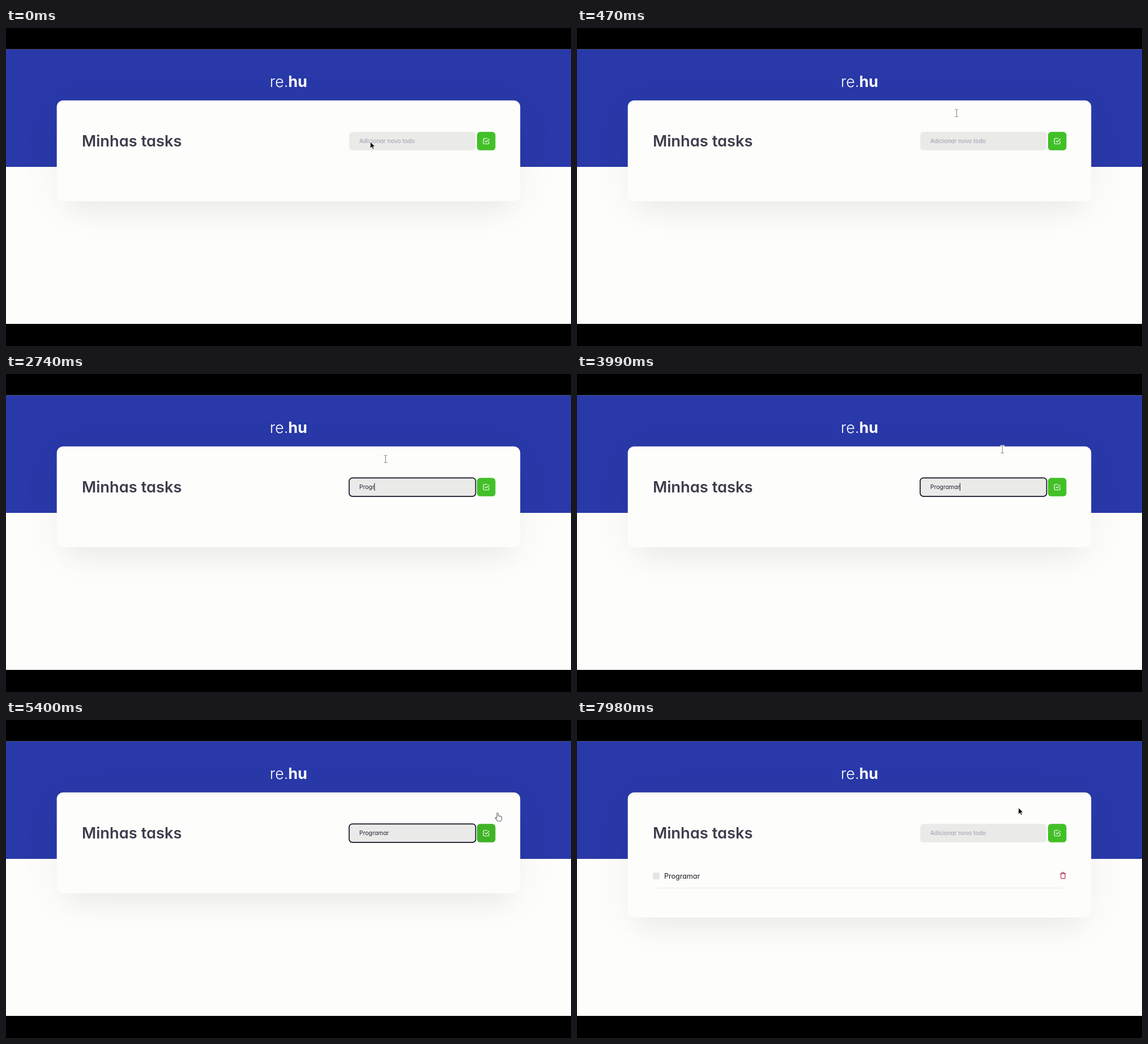
Write an HTML page that moves like this. It is 998x561 px and loops after 8000 ms.

```html
<!DOCTYPE html>
<html lang="pt">
<head>
<meta charset="utf-8">
<title>Minhas tasks</title>
<style>
  html, body { margin: 0; width: 100%; height: 100%; overflow: hidden; background: #000; }
  svg { display: block; width: 100%; height: 100%; }
  text { font-family: Inter, "Open Sans", sans-serif; font-feature-settings: "cv11"; white-space: pre; }
  .icon { fill: none; stroke-linecap: round; stroke-linejoin: round; }
</style>
</head>
<body>
<svg viewBox="0 0 998 561">
  <defs>
    <filter id="wide" filterUnits="userSpaceOnUse" x="-100" y="-50" width="1200" height="700"><feGaussianBlur stdDeviation="40"/></filter>
    <filter id="near" filterUnits="userSpaceOnUse" x="-100" y="-50" width="1200" height="700"><feGaussianBlur stdDeviation="22"/></filter>
  </defs>

  <rect y="37" width="998" height="485" fill="#fdfdfb"/>
  <rect y="37.5" width="998" height="207.5" fill="#2939a9"/>

  <rect class="grow" data-h="177.5" x="90" y="138" width="818" rx="11" opacity=".045" filter="url(#wide)"/>
  <rect class="grow" data-h="167.5" x="108" y="156" width="782" rx="11" opacity=".04" filter="url(#near)"/>
  <rect class="grow" data-h="177.8" x="89.7" y="127.7" width="818.6" rx="11.5" fill="#fdfdfb"/>

  <text x="466" y="104" font-size="27" font-weight="300" fill="#fff">re.<tspan font-weight="700">hu</tspan></text>
  <text x="134" y="208.5" font-size="27.3" font-weight="600" fill="#3d3d4d">Minhas tasks</text>

  <rect x="606.3" y="183.3" width="223" height="32.5" rx="5.5" fill="#eaeae8"/>
  <rect id="ring" x="606.2" y="183.4" width="223.4" height="32.4" rx="5.5" fill="none" stroke="#111120" stroke-width="1.7"/>
  <text id="hint" x="624" y="203" font-size="10.3" fill="#9d9ab0">Adicionar novo todo</text>
  <text id="typed" x="624" y="203" font-size="10.4" fill="#25243a"></text>
  <rect id="caret" y="192.5" width="1" height="13.5" fill="#111"/>

  <rect id="button" x="832" y="183.3" width="32.5" height="32.5" rx="5.5"/>
  <g class="icon" stroke="#fff" stroke-width="1.15">
    <path d="M846.4 199.2l1.9 1.9 5.2-5.3"/>
    <path d="M853 199.9v3.4a1.2 1.2 0 0 1-1.2 1.2h-7.3a1.2 1.2 0 0 1-1.2-1.2v-7.3a1.2 1.2 0 0 1 1.2-1.2h5.6"/>
  </g>

  <g id="task">
    <rect x="134" y="269" width="12" height="12" rx="2" fill="#e6e6e8"/>
    <text x="154" y="279.7" font-size="12.5" fill="#1c1c22">Programar</text>
    <path d="M134 296.5H864.5" stroke="#eeeee0"/>
    <path class="icon" stroke="#b32f4a" stroke-width="1.2" d="M853.6 271.2h9.6M854.8 271.2v7.2a1.2 1.2 0 0 0 1.2 1.2h4.8a1.2 1.2 0 0 0 1.2-1.2v-7.2M856.3 271v-1a1.2 1.2 0 0 1 1.2-1.2h1.8a1.2 1.2 0 0 1 1.2 1.2v1"/>
  </g>

  <g id="arrow"><path d="M0 0V11.2L2.7 8.8 4.5 12.7 6.4 11.9 4.6 8.1 8.2 8Z" stroke="#fff" stroke-width=".7"/></g>
  <g id="beam" class="icon">
    <path id="bar" stroke="#fff" stroke-width="2.6" d="M-2.6-6.3H-1Q0-6.3 0-5.3V5.3Q0 6.3-1 6.3H-2.6M2.6-6.3H1Q0-6.3 0-5.3M2.6 6.3H1Q0 6.3 0 5.3"/>
    <path stroke="#85858a" stroke-width="1.1" d="M-2.6-6.3H-1Q0-6.3 0-5.3V5.3Q0 6.3-1 6.3H-2.6M2.6-6.3H1Q0-6.3 0-5.3M2.6 6.3H1Q0 6.3 0 5.3"/>
  </g>
  <g id="hand"><path fill="#fff" stroke="#68686e" stroke-width="1.1" stroke-linejoin="round" d="M-3 2.2V-6A1.25 1.25 0 0 1-.5-6V-1.6Q.8-2.6 1.8-1.3 3-2.1 3.9-.8 5.6-1.2 5.7.6V3Q5.6 5 4.2 7.3H-2.2Q-3.6 4.5-5.6 2.2C-6.2.6-4.6.2-3 2.2Z"/></g>

  <rect width="998" height="37.5"/>
  <rect y="522" width="998" height="39"/>
</svg>
<script>
  const LOOP = 8000, WORD = "Programar";
  const FOCUS = 900, KEY = 1640, KEY_GAP = 240, PRESS = 7500, ADD = 7800;
  const $ = id => document.getElementById(id);
  const growing = document.querySelectorAll(".grow");

  // time, x, y of the pointer
  const path = [
    [30, 643.5, 201], [180, 670.5, 150], [3310, 670.5, 150], [3920, 751.5, 133],
    [4140, 751.5, 133], [4870, 870, 171], [6610, 870, 171], [7080, 824.5, 178.5],
    [ADD, 824.5, 178.5], [7970, 779.8, 155]
  ];

  const clamp = v => Math.max(0, Math.min(1, v));
  const ease = v => v * v * (3 - 2 * v);
  const show = (id, on) => $(id).setAttribute("visibility", on ? "visible" : "hidden");

  function pointer(t) {
    let [, x, y] = path[0];
    for (let i = 1; i < path.length; i++) {
      const [t0, x0, y0] = path[i - 1], [t1, x1, y1] = path[i];
      if (t < t0) break;
      const k = ease(clamp((t - t0) / (t1 - t0)));
      x = x0 + (x1 - x0) * k;
      y = y0 + (y1 - y0) * k;
    }
    return `translate(${x} ${y})`;
  }

  function cursorKind(t) {
    if (t < 110 || t >= 7850) return "arrow";
    return t < 4560 ? "beam" : "hand";
  }

  function drawInput(t) {
    const count = t < KEY || t >= ADD ? 0 : Math.min(WORD.length, 1 + Math.floor((t - KEY) / KEY_GAP));
    const lastKey = KEY + KEY_GAP * (WORD.length - 1);
    const focused = t >= FOCUS && t < PRESS;
    const since = t < KEY ? t - FOCUS : Math.max(0, t - lastKey);
    $("typed").textContent = WORD.slice(0, count);
    const width = count ? $("typed").getComputedTextLength() : 0;
    $("caret").setAttribute("x", 623.5 + width);
    show("caret", focused && Math.floor(since / 500) % 2 === 0);
    show("ring", focused);
    show("hint", count === 0);
  }

  function draw(t) {
    const added = t >= ADD;
    growing.forEach(r => r.setAttribute("height", +r.dataset.h + (added ? 43 : 0)));
    show("task", added);
    drawInput(t);

    const hover = clamp((t - 4560) / 200) - clamp((t - 7850) / 120);
    const mix = (a, b) => Math.round(a + (b - a) * hover);
    $("button").setAttribute("fill", `rgb(${mix(66, 62)},${mix(192, 179)},${mix(40, 38)})`);

    const kind = cursorKind(t);
    for (const id of ["arrow", "beam", "hand"]) show(id, id === kind);
    $(kind).setAttribute("transform", pointer(t));
  }

  function tick() {
    draw(performance.now() % LOOP);
    requestAnimationFrame(tick);
  }
  tick();
</script>
</body>
</html>
```
